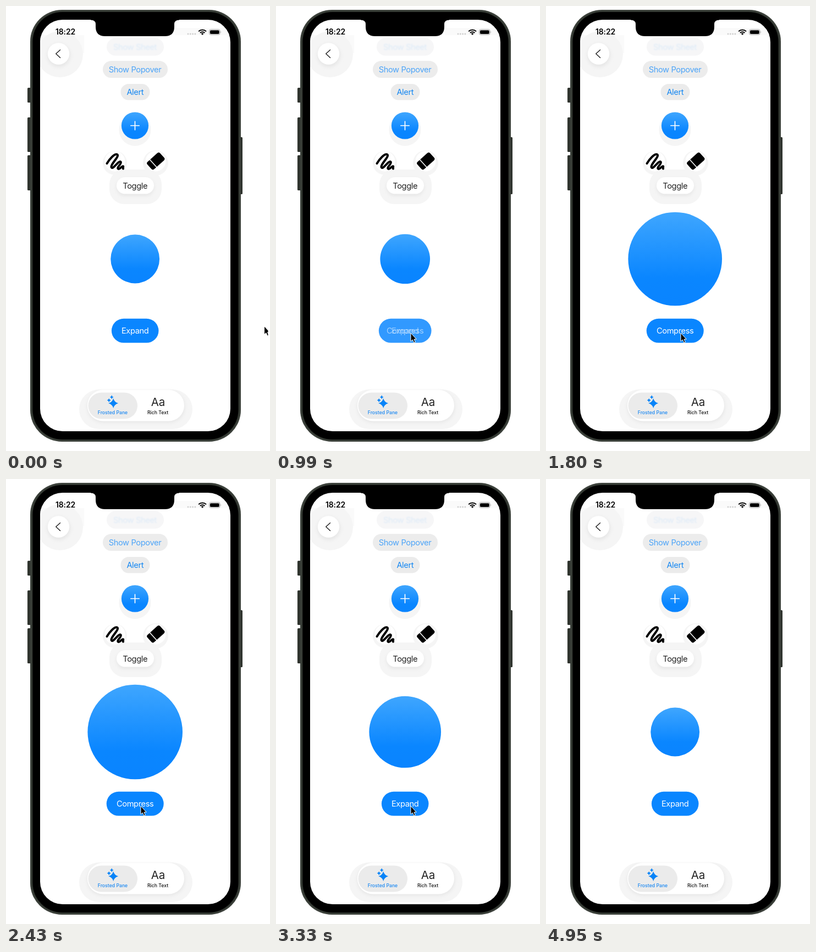
An HTML page for the animation above (5310 ms loop, 480 by 811 pixels).

```html
<!DOCTYPE html>
<html lang="en">
<head>
<meta charset="utf-8">
<title>Expanding circle</title>
<style>
html, body { margin: 0; width: 100%; height: 100%; overflow: hidden; background: #fff; }
svg { display: block; width: 100%; height: 100%; }
text { font-family: Inter, Roboto, sans-serif; font-size: 14.7px; letter-spacing: -.4px; text-anchor: middle; }
text.tab { font-size: 8.7px; font-weight: 550; letter-spacing: 0; }
</style>
</head>
<body>
<svg viewBox="0 0 480 811" xmlns="http://www.w3.org/2000/svg">
  <defs>
    <linearGradient id="blue" x1="0" y1="0" x2="0" y2="1">
      <stop offset="0" stop-color="#3fa6fe"/>
      <stop offset=".7" stop-color="#0a86ff"/>
      <stop offset="1" stop-color="#0a84ff"/>
    </linearGradient>
    <filter id="soft" x="-40%" y="-40%" width="180%" height="180%"><feGaussianBlur stdDeviation="3"/></filter>
    <filter id="haze"><feGaussianBlur stdDeviation="1.1"/></filter>
    <clipPath id="screen"><rect x="62" y="25" width="346" height="750" rx="41"/></clipPath>
    <clipPath id="view"><rect width="476.5" height="811"/></clipPath>
  </defs>

  <!-- phone body -->
  <g fill="#30352f">
    <rect x="39" y="149" width="8" height="27" rx="1.5"/>
    <rect x="39" y="203" width="8" height="63" rx="1.5"/>
    <rect x="39" y="272" width="8" height="64" rx="1.5"/>
    <rect x="422" y="239" width="8" height="104" rx="1.5"/>
    <rect x="44" y="7" width="383" height="787" rx="58"/>
  </g>
  <rect x="45.5" y="8.5" width="380" height="784" rx="56.5" fill="none" stroke="#4a5049" stroke-width="1"/>
  <rect x="48.5" y="11" width="374" height="779" rx="54"/>
  <rect x="62" y="25" width="346" height="750" rx="41" fill="#fff"/>

  <!-- halos -->
  <g clip-path="url(#screen)" fill="#f5f5f5">
    <path d="M62 53H142V86H62ZM307 40H408V53H307Z" fill="#fafafa"/>
    <circle cx="98" cy="88" r="42"/>
    <circle cx="234.5" cy="226" r="29"/>
    <circle cx="198" cy="286" r="22"/>
    <circle cx="272" cy="286" r="23"/>
    <rect x="188" y="298" width="95" height="63" rx="27"/>
    <rect x="133" y="699" width="206" height="72" rx="36"/>
  </g>
  <g filter="url(#soft)" fill="#e6e6e6">
    <circle cx="96" cy="90" r="21"/>
    <rect x="201" y="315" width="68" height="31" rx="15.5"/>
    <rect x="148" y="702" width="177" height="57" rx="28"/>
  </g>
  <g fill="#fff">
    <circle cx="95.5" cy="87" r="19.7"/>
    <circle cx="198" cy="283" r="18.5"/>
    <circle cx="272" cy="283" r="18.5"/>
    <rect x="201" y="312" width="68" height="30.5" rx="15.2"/>
    <rect x="148" y="699.5" width="176" height="57" rx="28.5"/>
  </g>

  <!-- notch and status bar -->
  <path d="M154 24H315V25.5Q306 25.5 306 33V38Q306 55 289 55H180Q163 55 163 38V33Q163 25.5 154 25.5Z"/>
  <text x="108" y="52.2" style="font-size:13.9px;font-weight:600;letter-spacing:-.1px">18:22</text>
  <g fill="#cfcfcf">
    <circle cx="331" cy="51" r="1.4"/><circle cx="335.3" cy="51" r="1.4"/>
    <circle cx="339.6" cy="51" r="1.4"/><circle cx="343.9" cy="51" r="1.4"/>
  </g>
  <g fill="none" stroke="#000" stroke-width="2.1">
    <path d="M350.2 46.2A10 10 0 0 1 364 46.2"/>
    <path d="M352.9 49A6.1 6.1 0 0 1 361.3 49"/>
  </g>
  <path d="M354.8 50.4A3.3 3.3 0 0 1 359.4 50.4L357.1 53Z"/>
  <rect x="369.5" y="42.8" width="19.6" height="9.6" rx="3" fill="#fff" stroke="#999" stroke-width=".9"/>
  <rect x="370.9" y="44.2" width="16.8" height="6.8" rx="1.8"/>
  <path d="M390.2 46Q392 47.5 390.2 49.2Z" fill="#999"/>
  <path d="M98.5 80L90.8 87L98.5 94.2" fill="none" stroke="#222" stroke-width="1.5" stroke-linecap="round" stroke-linejoin="round"/>

  <!-- controls -->
  <rect x="183" y="58.5" width="104" height="32" rx="16" fill="#f6f6f7"/>
  <text x="234.5" y="80" fill="#d6e7f8" opacity=".8" filter="url(#haze)">Show Sheet</text>
  <rect x="176" y="100" width="118" height="31" rx="15.5" fill="#ececec"/>
  <text x="234.5" y="121.3" fill="#4ca4f8">Show Popover</text>
  <rect x="208.5" y="142" width="53" height="29.5" rx="14.7" fill="#ebebeb"/>
  <text x="234.8" y="162" fill="#1688f2">Alert</text>
  <circle cx="234.5" cy="218" r="24.6" fill="url(#blue)"/>
  <path d="M226.8 218H242.2M234.5 210.3V225.7" stroke="#fff" stroke-width="1.7" stroke-linecap="round"/>
  <path d="M183.5 287C188 279 197 269 202 270.5C208 273 188 290 192 294.5C195 298 205 281 208.5 284C211.5 287 200.5 294 204 296.8C207 298.5 211 290.5 213 292C214 293 212 295.5 213 296.5" fill="none" stroke="#000" stroke-width="4" stroke-linecap="round" stroke-linejoin="round"/>
  <g transform="translate(272.3 282.7) rotate(-42)">
    <rect x="-15.5" y="-9" width="31" height="18" rx="3.6"/>
    <path d="M-6.2 -10V10" stroke="#fff" stroke-width="1.5"/>
  </g>
  <text x="234.7" y="332.6" fill="#222">Toggle</text>

  <!-- tab bar -->
  <rect x="149.5" y="704.5" width="89.5" height="48" rx="24" fill="#ebebeb"/>
  <g id="stars" fill="#0a84f8"></g>
  <text class="tab" x="194" y="744" fill="#1a88f2">Frosted Pane</text>
  <text x="276.5" y="729.3" fill="#222" style="font-size:20.5px;letter-spacing:0">Aa</text>
  <text class="tab" x="276" y="744" fill="#111">Rich Text</text>

  <!-- animated parts -->
  <circle id="ball" cx="234.7" cy="461" fill="url(#blue)"/>
  <rect id="button" y="569.8" height="44" rx="22" fill="#0a86ff"/>
  <text id="expand" x="234.7" y="597.3" fill="#fff">Expand</text>
  <text id="compress" y="597.3" fill="#fff">Compress</text>
  <g clip-path="url(#view)">
    <path id="cursor" d="M0 0V15.2L3.4 12.2L5.7 17.6L8.3 16.5L6 11.2H10.3Z" stroke="#fff" stroke-width="1" stroke-linejoin="round"/>
  </g>
</svg>
<script>
const LOOP = 5310, STEP = 90, CX = 234.7;
const $ = id => document.getElementById(id);
const set = (id, attrs) => { for (const k in attrs) $(id).setAttribute(k, attrs[k]); };
const clamp = x => Math.min(1, Math.max(0, x));
const mix = (a, b, p) => a + (b - a) * p;

// cubic-bezier(.42, 0, .58, 1), solved by bisection
function ease(x) {
  let lo = 0, hi = 1;
  for (let i = 0; i < 20; i++) {
    const s = (lo + hi) / 2, u = 1 - s;
    if (1.26 * u * u * s + 1.74 * u * s * s + s ** 3 < x) lo = s; else hi = s;
  }
  return lo * lo * (3 - 2 * lo);
}
const tween = (t, start, span) => ease(clamp((t - start) / span));
const press = (t, down, up) => clamp((t - down) / 90) * clamp((up - t) / 100);

function star(x, y, r) {
  const k = r * .2;
  return `<path d="M${x} ${y - r}Q${x + k} ${y - k} ${x + r} ${y}Q${x + k} ${y + k} ${x} ${y + r}Q${x - k} ${y + k} ${x - r} ${y}Q${x - k} ${y - k} ${x} ${y - r}Z"/>`;
}
$('stars').innerHTML = star(195.2, 724, 9) + star(192.2, 712.8, 3.6) + star(187.2, 718.6, 3.6);

function draw(time) {
  let t = Math.floor(time / STEP) * STEP;
  if (t > 4320 && t < 4680) t = 4320;

  const grow = tween(t, 880, 1030) - tween(t, 2820, 1020);
  const wide = tween(t, 900, 170) - tween(t, 2775, 170);
  const held = press(t, 810, 1090) + press(t, 2700, 2930);
  const w = mix(85.6, 104, wide);
  const slide = t > 2700 ? 9 * (1 - wide) : 0;

  set('ball', { r: mix(44.4, 86.3, grow) });
  set('button', { x: CX - w / 2, width: w, 'fill-opacity': 1 - .16 * held });
  set('expand', { opacity: 1 - wide });
  set('compress', { x: CX + slide, opacity: wide });

  const come = tween(t, 0, 600), leave = tween(t, 3820, 340);
  const x = mix(469.5, 245, come) + 26 * leave;
  const y = mix(583.5, 596, come) + 2 * leave;
  set('cursor', { transform: `translate(${x} ${y})`, visibility: t < 4680 ? 'visible' : 'hidden' });
}

const begin = performance.now();
function tick() {
  draw((performance.now() - begin) % LOOP);
  requestAnimationFrame(tick);
}
tick();
</script>
</body>
</html>
```
